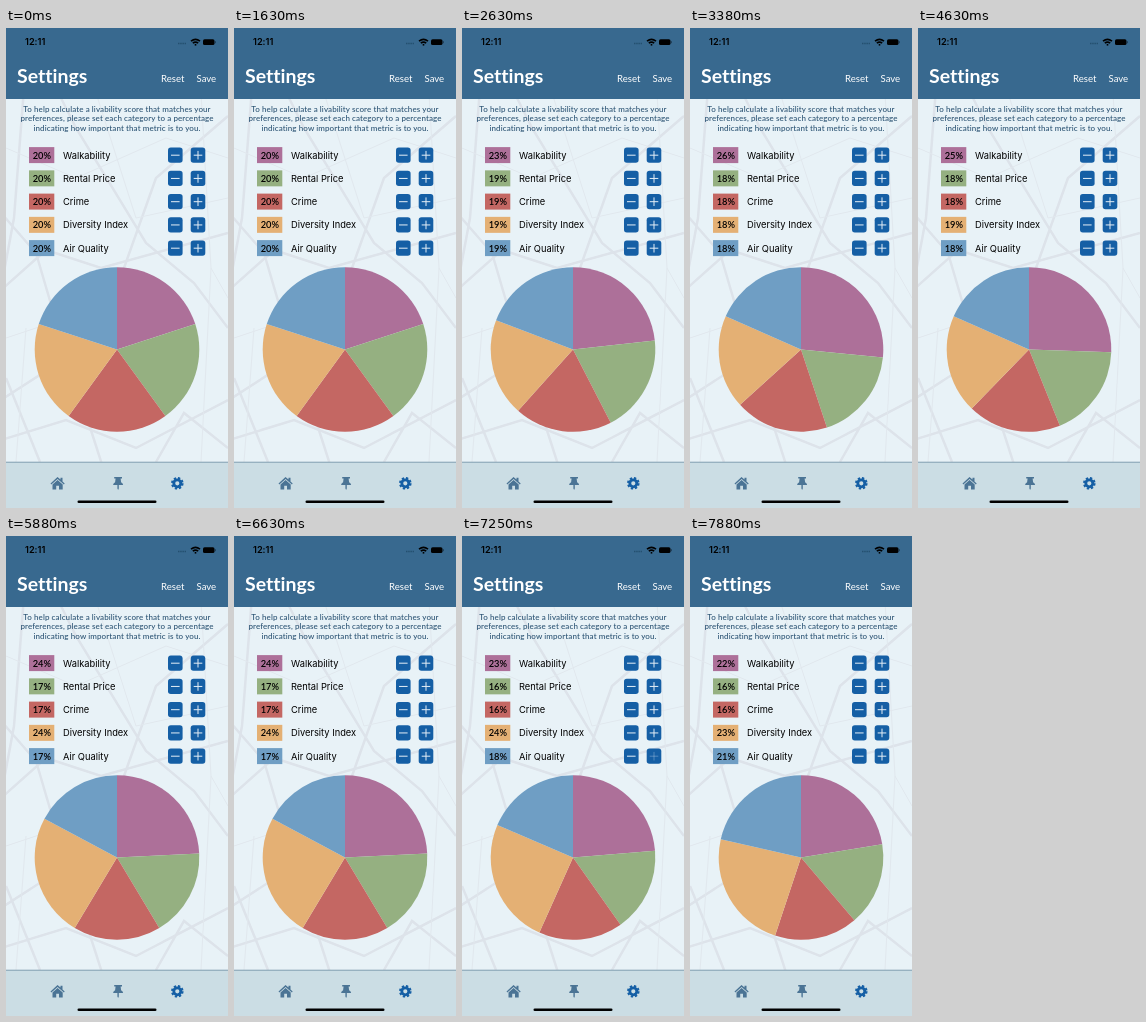
An HTML page for the animation above (8000 ms loop, 222 by 480 pixels).

```html
<!DOCTYPE html>
<html lang="en">
<head>
<meta charset="utf-8">
<title>Settings</title>
<style>
html, body { margin: 0; width: 100%; height: 100%; overflow: hidden; background: #e8f2f7; }
svg { display: block; width: 222px; height: 480px; }
text { font-family: Lato, "Open Sans", sans-serif; font-variant-ligatures: none; }
.ui { font-family: Inter, Roboto, sans-serif; }
</style>
</head>
<body>
<svg id="stage" viewBox="0 0 222 480">
  <rect width="222" height="480" fill="#e8f2f7"/>
  <g fill="none" stroke="#dde3ea" stroke-width="2.500">
    <path d="M-5 262L40 222L95 240L222 205M-5 185L30 225L52 300L110 480M18 60L8 190L-5 260"/>
    <path d="M222 88L150 150L118 240L60 330L-5 372M222 300L188 255L140 215L70 100L50 60"/>
    <path d="M-5 412L60 392L130 420L222 372M222 420L178 385L150 434M0 350L34 434"/>
    <path stroke="#e1e8ee" stroke-width="1" d="M0 120L70 150L160 110L222 130M195 65L205 240L222 270M0 310L60 290M205 240L195 434M10 434L20 300M90 65L130 190L222 170"/>
  </g>

  <rect width="222" height="71" fill="#38698f"/>
  <text class="ui" x="19" y="17.300" font-size="9.200" font-weight="600">12:11</text>
  <path d="M172 15.500h8" stroke="#24506f" stroke-width="1.300" stroke-dasharray="1.500 .7"/>
  <g fill="none" stroke="#000" stroke-width="1.600">
    <path d="M185 13.200q4.500 -3.600 9 0M186.800 15.200q2.700 -2.100 5.400 0"/>
    <path d="M188.700 16.800h1.600"/>
  </g>
  <rect x="197" y="11.300" width="11.500" height="5.700" rx="1.600"/>
  <path d="M209.300 13.200v2" stroke="#1c3850"/>
  <g fill="#fff">
    <text x="11" y="55.300" font-size="19.500" font-weight="700">Settings</text>
    <text x="155" y="54" font-size="9.600">Reset</text>
    <text x="190.500" y="54" font-size="9.600">Save</text>
  </g>

  <g fill="#2b5373" font-size="8" font-weight="500" letter-spacing=".1" text-anchor="middle">
    <text x="111" y="83.800">To help calculate a livability score that matches your</text>
    <text x="111" y="93.200">preferences, please set each category to a percentage</text>
    <text x="111" y="102.700">indicating how important that metric is to you.</text>
  </g>
  <g id="rows"></g>
  <g id="pie"></g>

  <rect y="434" width="222" height="46" fill="#cbdde4"/>
  <path d="M0 434.200h222" stroke="#6f8fa5" stroke-width=".8"/>
  <g fill="#4b7495">
    <path d="M44.500 455.500L51.500 449L54.500 451.600V449.700H56.500V453.500L58.700 455.500L57.900 456.500L51.600 450.900L45.300 456.500Z"/>
    <path d="M46.500 456.500L51.600 452L56.700 456.500V461.500H53V457.800H50.200V461.500H46.500Z"/>
    <path d="M108.200 449h7.800v1.600h-1.400l.5 3.600q2 .9 2 2.800h-4.300v3.500l-.7 1.500l-.7 -1.500v-3.500h-4.300q0 -1.900 2 -2.800l.5 -3.600h-1.400z"/>
  </g>
  <g fill="none" stroke="#155fa5">
    <circle cx="171.300" cy="455.300" r="3.500" stroke-width="2.800"/>
    <circle cx="171.300" cy="455.300" r="5.300" stroke-width="2" stroke-dasharray="2.300 1.863"/>
  </g>
  <rect x="71.500" y="472.500" width="79" height="2.600" rx="1.300"/>
</svg>
<script>
const LOOP = 8000, STEP = 250, DIM = 125;
const items = [
  ['Walkability', '#ad7099'],
  ['Rental Price', '#95b081'],
  ['Crime', '#c46763'],
  ['Diversity Index', '#e4b074'],
  ['Air Quality', '#6f9ec4']
];
// Runs of taps on a plus button: item, time of first tap, count
const runs = [[0, 2125, 6], [3, 4625, 6], [4, 7125, 4]];
const taps = runs.flatMap(([item, start, count]) =>
  Array.from({ length: count }, (_, i) => ({ item, at: start + i * STEP })));

const button = (x, y, sign) => `
  <rect x="${x}" y="${y - 7.8}" width="14.600" height="15.200" rx="2.800" fill="#155fa5"/>
  <path class="${sign}" d="M${x + 3} ${y - .2}h8.600${sign === 'plus' ? 'm-4.300 -4.300v8.600' : ''}" stroke="#e4eef6" fill="none"/>`;

document.getElementById('rows').innerHTML = items.map(([name, color], i) => {
  const y = 127.4 + i * 23.25;
  return `<rect x="23" y="${y - 8.3}" width="25.300" height="16" fill="${color}"/>
    <text class="value" x="35.800" y="${y + 3.3}" font-size="9.300" font-weight="600" text-anchor="middle"></text>
    <text class="ui" x="57" y="${y + 3.2}" font-size="9.300">${name}</text>
    ${button(162, y, 'minus')}${button(184.7, y, 'plus')}`;
}).join('');
const pie = document.getElementById('pie');
pie.innerHTML = items.map(([, color]) => `<path fill="${color}"/>`).join('');

const values = document.querySelectorAll('.value');
const pluses = document.querySelectorAll('.plus');

// A tap adds one point and shrinks the other shares in proportion
function percentsAt(t) {
  let shares = items.map(() => 20);
  for (const { item, at } of taps) {
    if (t < at) break;
    const scale = 1 - 1 / (100 - shares[item]);
    shares = shares.map((s, i) => i === item ? s + 1 : s * scale);
  }
  return shares.map(s => Math.floor(s + 1e-6));
}

const rim = turn => {
  const a = turn * 2 * Math.PI;
  return `${111 + 82.3 * Math.sin(a)} ${321.5 - 82.3 * Math.cos(a)}`;
};

function draw(now) {
  const t = now % LOOP;
  const percents = percentsAt(t);
  const total = percents.reduce((a, b) => a + b);
  let from = 0;
  percents.forEach((percent, i) => {
    const to = from + percent / total;
    values[i].textContent = percent + '%';
    pie.children[i].setAttribute('d',
      `M111 321.5L${rim(from)}A82.3 82.3 0 0 1 ${rim(to)}Z`);
    from = to;
    const held = taps.some(p => p.item === i && t >= p.at - DIM && t < p.at);
    pluses[i].setAttribute('stroke-opacity', held ? .3 : 1);
  });
  requestAnimationFrame(draw);
}
draw(0);
</script>
</body>
</html>
```
